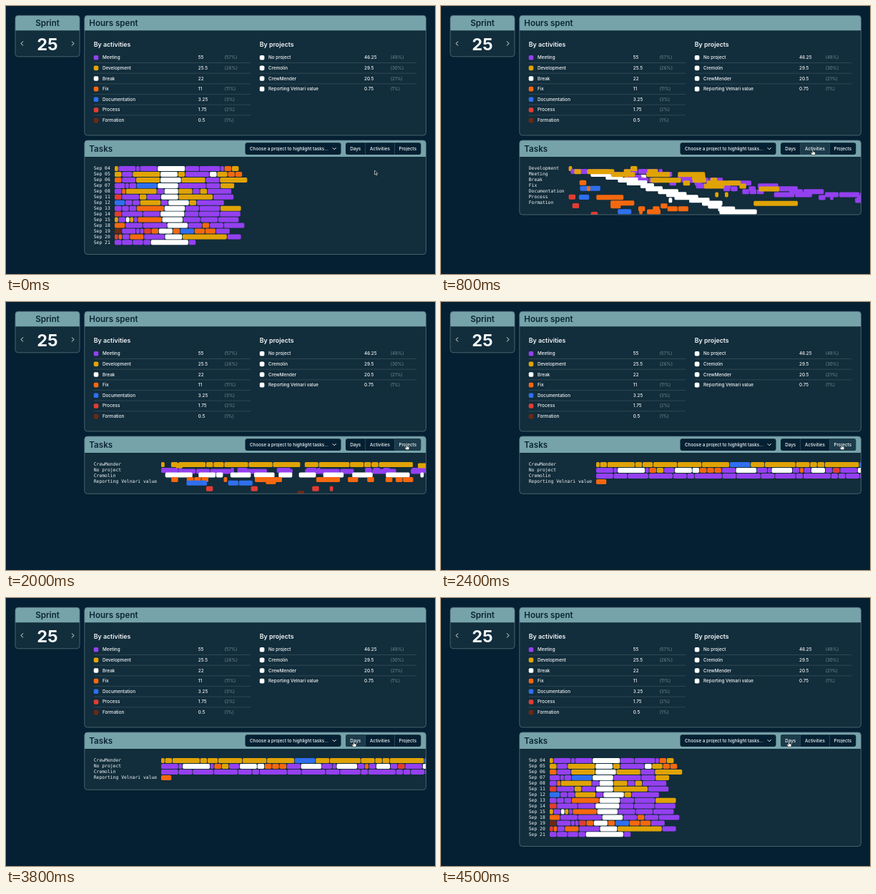
An HTML page for the animation above (4.6 s loop, 600 by 375 pixels).

```html
<!DOCTYPE html>
<html lang="en">
<head>
<meta charset="utf-8">
<title>Sprint tasks</title>
<style>
html, body { margin: 0; width: 100%; height: 100%; overflow: hidden; background: #042032; }
svg { display: block; width: 600px; height: 375px; }
text { font: 500 6.3px Inter, "Open Sans", sans-serif; fill: #f4f7f8; dominant-baseline: central; white-space: pre; }
.head { font-size: 11.6px; font-weight: 600; fill: #0a2536; }
.big { font-size: 23.5px; font-weight: 700; }
.sub { font-size: 8.8px; font-weight: 600; }
.dim { fill: #758892; font-weight: 400; }
.mono { font: 6.4px "DejaVu Sans Mono", monospace; }
.mid { text-anchor: middle; }
.card { fill: #122d3b; }
.edge { fill: none; stroke: #58727c; stroke-width: .8; }
.bar { fill: #76a3aa; }
.dark { fill: #042032; }
.line { stroke: #3c5460; stroke-width: .7; }
.icon { fill: none; stroke: #f4f7f8; stroke-width: 1; stroke-linecap: round; stroke-linejoin: round; }
</style>
</head>
<body>
<svg id="stage" viewBox="0 0 600 375"></svg>
<script>
const LOOP = 4600, MOVE = 500, RESIZE = 150;
const COLORS = { m: '#9440f0', d: '#e0a306', b: '#ffffff', f: '#f5680f', o: '#2f6fee', p: '#e23c33', x: '#6b2a14' };

// One line per day: activity letter + quarter hours. Capitals have no project, g is the small side project.
const DAYS = `d1 M5 M1 m5 b8 m4 m6 M1 f2 D2
d2 M3 d8 b5 d2 m7 b2 d3 f2 f2
f2 M4 d7 b6 d7 m4 d8
M3 M1 m2 o6 b6 m8 m4 d4
M2 f1 d9 M2 b4 d4 M2 d2 m7
p2 M5 d2 m4 b5 d10 m6
o3 m2 M2 D6 M2 b6 D2 m8
m2 m2 M2 f8 b6 m4 M6 D6
p2 m6 M5 b7 m4 M6 M6
D1 M2 b1 D1 M1 f7 b6 m5 M5 m6
f3 m5 M7 b6 m4 f2 M4 M6
x2 m4 M1 M1 p2 f2 b4 f2 o4 f3 g3 M4
p1 f1 M2 f4 m6 b5 D13 M4
M2 M3 M3 m2 b11 M2`;

const ACTIVITIES = ['Development', 'Meeting', 'Break', 'Fix', 'Documentation', 'Process', 'Formation'];
const PROJECTS = ['CrewMender', 'No project', 'Cremolin', 'Reporting Velnari value'];
const VIEWS = {
  days: { left: 152, bottom: 347.5, labels: [4, 5, 6, 7, 8, 11, 12, 13, 14, 15, 18, 19, 20, 21].map(n => 'Sep ' + String(n).padStart(2, '0')) },
  activities: { left: 178.6, bottom: 292, labels: ACTIVITIES },
  projects: { left: 217, bottom: 268.3, labels: PROJECTS }
};
const CLICKS = [[-9999, 'days'], [554, 'activities'], [1850, 'projects'], [3822, 'days']];
const PATH = [[0, 515.5, 230], [450, 519.5, 201], [750, 519.5, 201], [1200, 537.5, 210.5],
  [1650, 560.5, 199.5], [2600, 560.5, 199.5], [3500, 486.5, 201], [LOOP, 486.5, 201]];
const BUTTONS = [['Days', 475, 502.5], ['Activities', 502.5, 543.5], ['Projects', 543.5, 580]];

const tasks = DAYS.split('\n').flatMap((line, day) => line.split(' ').map(word => {
  const code = word[0], kind = code === 'g' ? 'f' : code.toLowerCase();
  const project = code === 'g' ? 3 : 'do'.includes(code) ? 0 : code === 'm' ? 2 : 1;
  return { kind, width: 4.75 * word.slice(1), row: { days: day, activities: 'dmbfopx'.indexOf(kind), projects: project }, x: {} };
}));
for (const view in VIEWS) {
  const ends = {};
  for (const task of tasks) {
    const row = task.row[view];
    task.x[view] = ends[row] || 0;
    ends[row] = task.x[view] + task.width + .8;
  }
}

const text = (x, y, s, cls = '') => `<text x="${x}" y="${y}" class="${cls}">${s}</text>`;
const box = (x, y, w, h, cls, r = 0) => `<rect x="${x}" y="${y}" width="${w}" height="${h}" rx="${r}" class="${cls}"/>`;
const icon = d => `<path class="icon" d="${d}"/>`;
const header = (x, y, w, h) => `<path class="bar" d="M${x} ${y + h}v${4 - h}q0-4 4-4h${w - 8}q4 0 4 4v${h - 4}z"/>`;

function table(x, title, rows, valueX, pctX) {
  return text(x, 53.5, title, 'sub') + rows.map(([name, value, pct, color], i) => {
    const y = 72.2 + i * 14.65;
    return `<rect x="${x}" y="${y - 3.3}" width="6.6" height="6.6" rx="1.8" fill="${color}"/>`
      + text(x + 12.3, y, name) + text(valueX, y, value) + text(pctX, y, pct, 'dim')
      + (i < rows.length - 1 ? `<path class="line" d="M${x} ${y + 7.3}h219.5"/>` : '');
  }).join('');
}

const c = COLORS, w = c.b;
document.getElementById('stage').innerHTML =
  `<clipPath id="clip"><rect id="clipBox" x="110" y="188" width="477.3"/></clipPath>`
  + box(13, 13.3, 90, 57.5, 'card', 4) + header(13, 13.3, 90, 21) + box(13, 13.3, 90, 57.5, 'edge', 4)
  + text(58, 24, 'Sprint', 'head mid') + text(58, 53, '25', 'big mid')
  + icon('M23.6 49.8l-2.5 2.7 2.5 2.7') + icon('M92.4 49.8l2.5 2.7-2.5 2.7')
  + box(109.8, 13.3, 477.6, 167.7, 'card', 4) + header(109.8, 13.3, 477.6, 21) + box(109.8, 13.3, 477.6, 167.7, 'edge', 4)
  + text(116.3, 24, 'Hours spent', 'head')
  + table(122.7, 'By activities', [
    ['Meeting', '55', '(57%)', c.m], ['Development', '25.5', '(26%)', c.d], ['Break', '22', '', w],
    ['Fix', '11', '(11%)', c.f], ['Documentation', '3.25', '(3%)', c.o],
    ['Process', '1.75', '(2%)', c.p], ['Formation', '0.5', '(1%)', c.x]], 268.8, 305.5)
  + table(354.8, 'By projects', [
    ['No project', '46.25', '(48%)', w], [PROJECTS[2], '29.5', '(30%)', w],
    [PROJECTS[0], '20.5', '(21%)', w], [PROJECTS[3], '0.75', '(1%)', w]], 501, 537.7)
  + `<rect id="panel" class="card" x="109.8" y="188" width="477.6" rx="4"/>`
  + header(109.8, 188, 477.6, 23)
  + text(116.3, 199.7, 'Tasks', 'head')
  + box(334.5, 191.3, 134, 16.6, 'dark', 3) + text(341, 199.6, 'Choose a project to highlight tasks...')
  + icon('M457 198.6l2.2 2.2 2.2-2.2')
  + box(475, 191.3, 105.3, 16.6, 'dark', 3)
  + `<rect id="hover" y="191.3" height="16.6" rx="2" fill="#1b3b4b"/>`
  + '<path class="line" d="M502.5 191.3v16.6M543.5 191.3v16.6"/>'
  + BUTTONS.map(([s, a, b]) => text((a + b) / 2, 199.6, s, 'mid')).join('')
  + '<g id="labels"></g><g clip-path="url(#clip)">'
  + tasks.map(t => `<rect class="task" width="${t.width}" height="7" rx="1.7" fill="${c[t.kind]}"/>`).join('')
  + '</g><rect id="edge" class="edge" x="109.8" y="188" width="477.6" rx="4"/>'
  + '<path id="arrow" d="M0 0v6l1.4-1.2 1 2.1 1-.5-1-2h1.9z" fill="#111" stroke="#fff" stroke-width=".6"/>'
  + '<path id="hand" d="M-.7.6q.7-1 1.4 0v2.2l2.4.6q.7.3.5 1.2l-.6 2.6h-3.8l-2-2.7q0-1 1-.7l1.1.8z" fill="#fff" stroke="#111" stroke-width=".5"/>';

const get = id => document.getElementById(id);
const bars = [...document.querySelectorAll('.task')];
const clamp = v => Math.max(0, Math.min(1, v));
const mix = (a, b, p) => a + (b - a) * p;

// cubic-bezier(.42, 0, .58, 1)
function easeInOut(v) {
  let lo = 0, hi = 1;
  for (let i = 0; i < 20; i++) {
    const s = (lo + hi) / 2, r = 1 - s;
    if (1.26 * s * r * r + 1.74 * s * s * r + s ** 3 < v) lo = s; else hi = s;
  }
  return lo * lo * (3 - 2 * lo);
}

function pointer(time) {
  const i = Math.max(1, PATH.findIndex(k => k[0] >= time));
  const [t0, x0, y0] = PATH[i - 1], [t1, x1, y1] = PATH[i];
  const p = easeInOut((time - t0) / (t1 - t0));
  return [mix(x0, x1, p), mix(y0, y1, p)];
}

let shown;
function draw(time) {
  const step = CLICKS.findLastIndex(k => time >= k[0]);
  const [start, to] = CLICKS[step], from = CLICKS[Math.max(0, step - 1)][1];
  const view = VIEWS[to];

  if (shown !== to) {
    shown = to;
    get('labels').innerHTML = view.labels.map((s, i) => text(122.7, 227.3 + i * 7.94, s, 'mono')).join('');
  }
  const height = mix(VIEWS[from].bottom, view.bottom, clamp((time - start) / RESIZE)) - 188;
  for (const id of ['panel', 'edge', 'clipBox']) get(id).setAttribute('height', height);

  const p = easeInOut(clamp((time - start) / MOVE));
  tasks.forEach((t, i) => {
    bars[i].setAttribute('x', view.left + mix(t.x[from], t.x[to], p));
    bars[i].setAttribute('y', 224.1 + 7.94 * mix(t.row[from], t.row[to], p));
  });

  const [x, y] = pointer(time);
  const over = y < 208 && BUTTONS.find(b => x >= b[1] && x < b[2]);
  get('hover').setAttribute('x', over ? over[1] : 0);
  get('hover').setAttribute('width', over ? over[2] - over[1] : 0);
  for (const [id, on] of [['arrow', !over], ['hand', over]]) {
    get(id).setAttribute('transform', `translate(${x} ${y})`);
    get(id).style.display = on ? '' : 'none';
  }
}

const begin = performance.now();
function tick() {
  draw((performance.now() - begin) % LOOP);
  requestAnimationFrame(tick);
}
tick();
</script>
</body>
</html>
```
